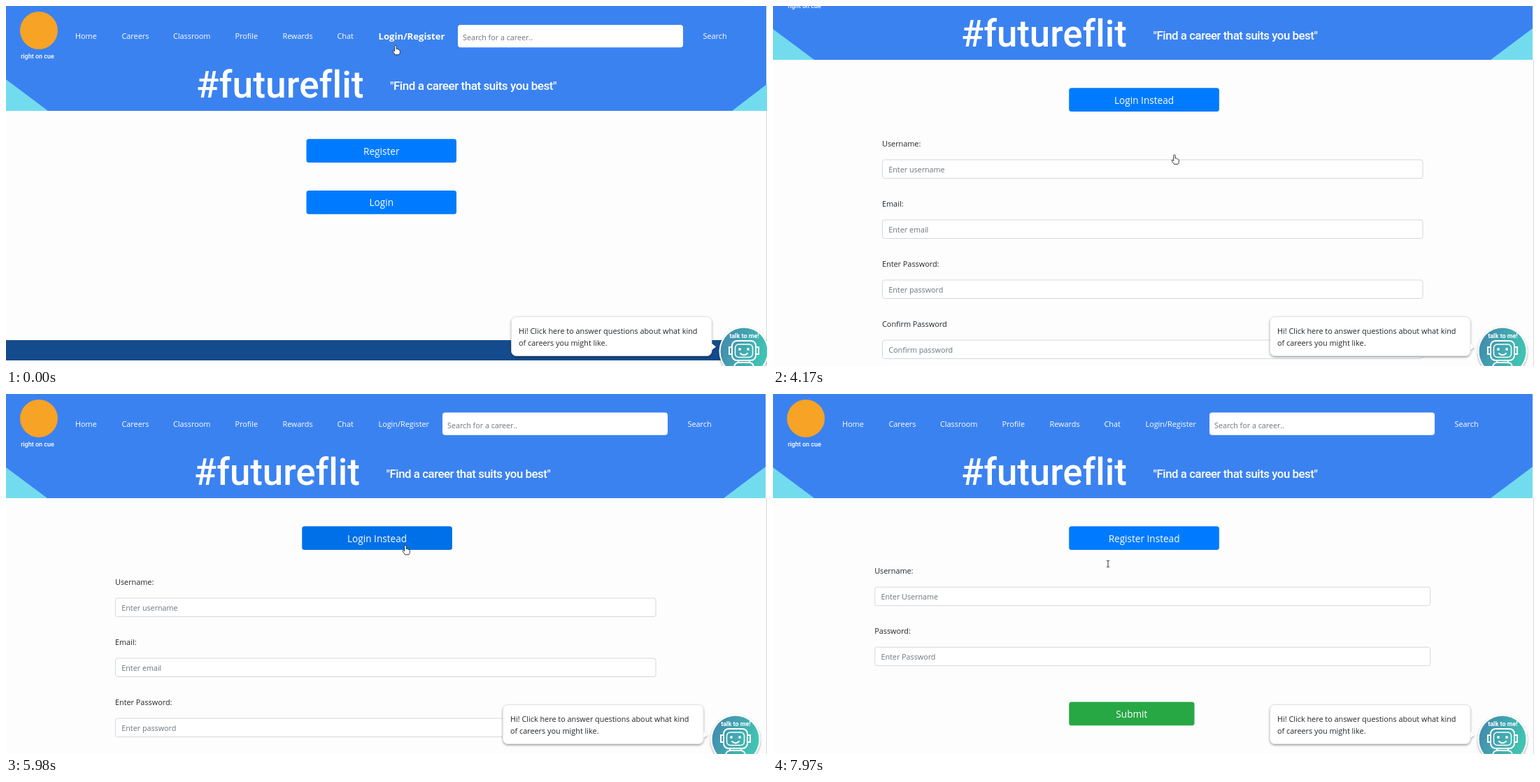
Write an HTML page that moves like this. It is 1088 px wide and 515 px high and loops after 8 s.

```html
<!DOCTYPE html>
<html lang="en">
<head>
<meta charset="utf-8">
<title>Career site walkthrough</title>
<style>
  html, body { margin: 0; width: 100%; height: 100%; overflow: hidden; background: #fdfdfd; }
  svg { display: block; width: 100vw; height: 100vh; }
  text { font: 10.85px "Open Sans", "Noto Sans", sans-serif; fill: #212529; }
  .nav { fill: #fff; }
  .big { font-size: 13.6px; fill: #fff; text-anchor: middle; }
  .hover { font-size: 13.15px; font-weight: 700; fill: #fff; }
  .hint { fill: #6c757d; font-size: 10.75px; }
  .brand { font-family: Roboto, Lato, sans-serif; font-weight: 500; fill: #fff;
    font-variant-ligatures: none; }
</style>
</head>
<body>
<svg id="stage" viewBox="0 0 1088 515"></svg>
<script>
const LOOP = 8000;
const BLUE = '#007bff', GREEN = '#28a745';

const rect = (x, y, w, h, fill, extra = '') =>
  `<rect x="${x}" y="${y}" width="${w}" height="${h}" fill="${fill}" ${extra}/>`;
const text = (x, y, str, cls = '', extra = '') =>
  `<text x="${x}" y="${y}" class="${cls}" ${extra}>${str}</text>`;
const button = (x, y, w, label, fill, cls = '') =>
  rect(x, y, w, 33.7, fill, `rx="3.5" class="${cls}"`) + text(x + w / 2, y + 22.3, label, 'big');
const field = (x, y, w, label, hint) =>
  text(x, y, label) +
  rect(x + .5, y + 19.5, w - 1, 26.5, '#fff', 'rx="3" stroke="#d3d8dd"') +
  text(x + 9.3, y + 37.5, hint, 'hint');

const searchBox = (x, y) =>
  rect(x, y, 322, 32.3, '#fff', 'rx="4"') +
  text(x + 7, y + 22, 'Search for a career..', 'hint') +
  text(x + 350.5, 47.3, 'Search', 'nav');

// Banner: the home page is slightly wider than the scrolling pages.
function header(home) {
  const w = home ? 1087 : 1086, h = home ? 150 : 149, r = home ? 1098 : 1086;
  const boxY = home ? 27 : 26.5;
  const items = [['Home', 99], ['Careers', 165.5], ['Classroom', 239], ['Profile', 327.5],
    ['Rewards', 395.5], ['Chat', 473.5]];
  const calm = `<g class="calm">${text(532.5, 47.3, 'Login/Register', 'nav')}${searchBox(624, boxY)}</g>`;
  const hot = `<g class="hot">${text(532.5, 48, 'Login/Register', 'hover')}${searchBox(646, boxY)}</g>`;
  const title = home ? [272, 130.5, 53.4] : [269, 130, 52.8];
  const motto = home ? [668, 120, 17] : [661, 119.5, 16.8];
  return rect(0, 0, w, h, '#3b82f1') +
    rect(1087, h, 1, 1400, '#d8d8d8') +
    `<path d="M0 105L${home ? 60 : 59} ${h}H0Z M${r - 60} ${h}L${r} 104V${h}Z" fill="#72dcee"/>` +
    '<circle cx="47" cy="35" r="27" fill="#f7a325"/>' +
    text(45, 75, 'right on cue', 'brand', 'style="font-size:9px" text-anchor="middle"') +
    items.map(([s, x]) => text(x, 47.3, s, 'nav')).join('') +
    calm + (home ? hot : '') +
    text(title[0], title[1], '#futureflit', 'brand', `style="font-size:${title[2]}px"`) +
    text(motto[0], motto[1], '"Find a career that suits you best"', 'brand',
      `style="font-size:${motto[2]}px;letter-spacing:-.45px" text-anchor="middle"`);
}

const footer = y => rect(0, y, 1087, 29, '#144b8c');
const page = body => `<g class="page">${body}</g>`;

const homePage = page(header(true) +
  button(429.5, 190.2, 214.5, 'Register', BLUE, 'key') +
  button(429.5, 264.1, 214.5, 'Login', BLUE) + footer(478));

const signUp = [['Username:', 'Enter username'], ['Email:', 'Enter email'],
  ['Enter Password:', 'Enter password'], ['Confirm Password', 'Confirm password'],
  ['First Name:', 'Enter first name'], ['Last Name:', 'Enter last name']];
const registerPage = page(header(false) +
  button(423.2, 189.2, 214.7, 'Login Instead', BLUE, 'key') +
  signUp.map(([l, h], i) => field(156, 272.5 + 86 * i, 773.5, l, h)).join('') +
  button(426.6, 798.8, 179.3, 'Submit', GREEN) + footer(977));

const signIn = [['Username:', 'Enter Username'], ['Password:', 'Enter Password']];
const loginPage = page(header(false) +
  button(423.2, 189.2, 214.7, 'Register Instead', BLUE, 'key') +
  signIn.map(([l, h], i) => field(145.2, 256.7 + 86 * i, 795, l, h)).join('') +
  button(423.2, 440.6, 179.3, 'Submit', GREEN) + footer(618));

const robot = `
  <circle cx="1055" cy="494" r="35.5" fill="#fff" filter="url(#soft)"/>
  <circle cx="1055" cy="494" r="33.5" fill="url(#teal)"/>
  <g fill="none" stroke="#fff" stroke-width="2" stroke-linecap="round">
    <rect x="1038" y="479" width="34" height="28" rx="7"/>
    <rect x="1042.5" y="484" width="25" height="18.5" rx="5" stroke-width="1.5"/>
    <path d="M1037 488h-3v10h3M1073 488h3v10h-3M1050 497q5 4.5 10 0"/>
    <path d="M1047 507v3h16v-3M1041 516q1-6 7-6h14q6 0 7 6"/>
  </g>
  <circle cx="1049" cy="491" r="1.9" fill="#fff"/><circle cx="1061" cy="491" r="1.9" fill="#fff"/>
  ${text(1055.5, 474.5, 'talk to me!', 'brand', 'style="font-size:9px;font-weight:700" text-anchor="middle"')}`;

const chat = `<g id="chat">
  <g filter="url(#soft)">
    <path d="M1008 482l7 5.5-7 5.5z" fill="#fff"/>
    ${rect(722.5, 444.5, 286.5, 56, '#fff', 'rx="7" stroke="#d9dcdf" stroke-width=".7"')}
  </g>
  ${text(733, 468.5, 'Hi! Click here to answer questions about what kind')}
  ${text(733, 486, 'of careers you might like.')}
  ${robot}</g>`;

// Each cursor has its hot spot at 0,0.
const cursors = `<g id="cursor">
  <path id="hand" d="M-1.3 7V.6Q-1.2-.6 0-.6 1.1-.6 1.2.6V4.6Q2.5 3.9 3.2 5.1 4.3 4.5 4.8 5.7
    6.2 5.4 6.3 7.2V9.5Q6.1 11.5 5 12.8H-.6Q-1.6 11-3.6 8.5-4.4 7-3.3 6.7-2.4 6.5-1.3 8Z"
    fill="#fff" stroke="#222" stroke-width=".9"/>
  <path id="arrow" d="M.4.3V9.3L2.5 7.4 4 10.7 5.4 10.1 3.9 6.9H6.6Z"
    fill="#fff" stroke="#222" stroke-width=".8"/>
  <path id="beam" d="M-2-4.5H-.7L0-4 .7-4.5H2M0-4V4M-2 4.5H-.7L0 4 .7 4.5H2"
    fill="none" stroke="#333" stroke-width="1"/>
</g>`;

const stage = document.getElementById('stage');
stage.innerHTML = `<defs>
  <linearGradient id="teal" x1="0" y1="0" x2="1" y2="0.4">
    <stop offset="0" stop-color="#4384ad"/><stop offset="1" stop-color="#41c3b3"/>
  </linearGradient>
  <filter id="soft" x="-20%" y="-20%" width="140%" height="150%">
    <feDropShadow dx="0" dy="1.5" stdDeviation="1.5" flood-color="#000" flood-opacity=".4"/>
  </filter></defs>` +
  rect(0, 0, 1088, 515, '#fdfdfd') + homePage + registerPage + loginPage + chat + cursors;

// Moves: first step, last step, step count, then scroll, x and y to reach.
const moves = [
  [120, 240, 2, 0, 557, 65],
  [1580, 1580, 1, 0, 557, 68],
  [1708, 2480, 7, 0, 991, 430, 'ease'],
  [2630, 2630, 1, 0, 990, 437],
  [2767, 3590, 7, 0, 574, 213.5, 'ease'],
  [4170, 4740, 5, 358, 574, 213.5],
  [4890, 5010, 2, 499, 574, 213.5],
  [5260, 5980, 6, 0, 571, 217],
  [6370, 6490, 2, 0, 499.5, 213.5],
  [6610, 6880, 3, 97, 499.5, 213.5],
  [7030, 7180, 2, 140, 479, 243],
  [7580, 7970, 4, 0, 479, 243]
];
const pageAt = [[0, 0], [3740, 1], [6100, 2]];
const cursorAt = [[0, 'hand'], [120, 'arrow'], [2630, 'hand'], [2767, 'arrow'], [3590, 'hand'],
  [5010, 'arrow'], [5980, 'hand'], [6610, 'arrow'], [7030, 'beam']];
const keyAt = [[0, BLUE], [3590, '#0075f3'], [3740, BLUE], [3860, '#0069d9'], [4170, BLUE],
  [5980, '#0070e8'], [6100, BLUE], [6220, '#0069d9'], [6610, BLUE]];

const pick = (table, t) => table.filter(row => row[0] <= t).pop()[1];

function pose(t) {
  let now = [0, 557, 57];
  for (const [t0, t1, n, s, x, y, ease] of moves) {
    if (t < t0) break;
    const step = n > 1 ? Math.floor((t - t0) / (t1 - t0) * (n - 1) + 1e-6) + 1 : 1;
    let p = Math.min(1, step / n);
    if (ease) p = p * p * (3 - 2 * p);
    now = [s, x, y].map((to, i) => now[i] + (to - now[i]) * p);
  }
  return now;
}

const pages = [...stage.querySelectorAll('.page')];
const keys = [...stage.querySelectorAll('.key')];
const chatBox = document.getElementById('chat');
const cursor = document.getElementById('cursor');
const hot = stage.querySelector('.hot');
const calm = stage.querySelector('.calm');
const show = (el, on) => el.setAttribute('display', on ? 'inline' : 'none');

function draw(t) {
  const [scroll, x, y] = pose(t);
  const current = pick(pageAt, t), shape = pick(cursorAt, t), fill = pick(keyAt, t);
  pages.forEach((el, i) => {
    show(el, i === current);
    el.setAttribute('transform', `translate(0 ${-Math.round(scroll)})`);
  });
  keys.forEach(el => el.setAttribute('fill', fill));
  show(hot, t < 120);
  show(calm, t >= 120);
  chatBox.setAttribute('transform', `translate(${current ? -12 : 0} 0)`);
  cursor.setAttribute('transform', `translate(${x} ${y})`);
  for (const el of cursor.children) show(el, el.id === shape);
}

const start = performance.now();
function tick() {
  draw((performance.now() - start) % LOOP);
  requestAnimationFrame(tick);
}
draw(0);
requestAnimationFrame(tick);
</script>
</body>
</html>
```
